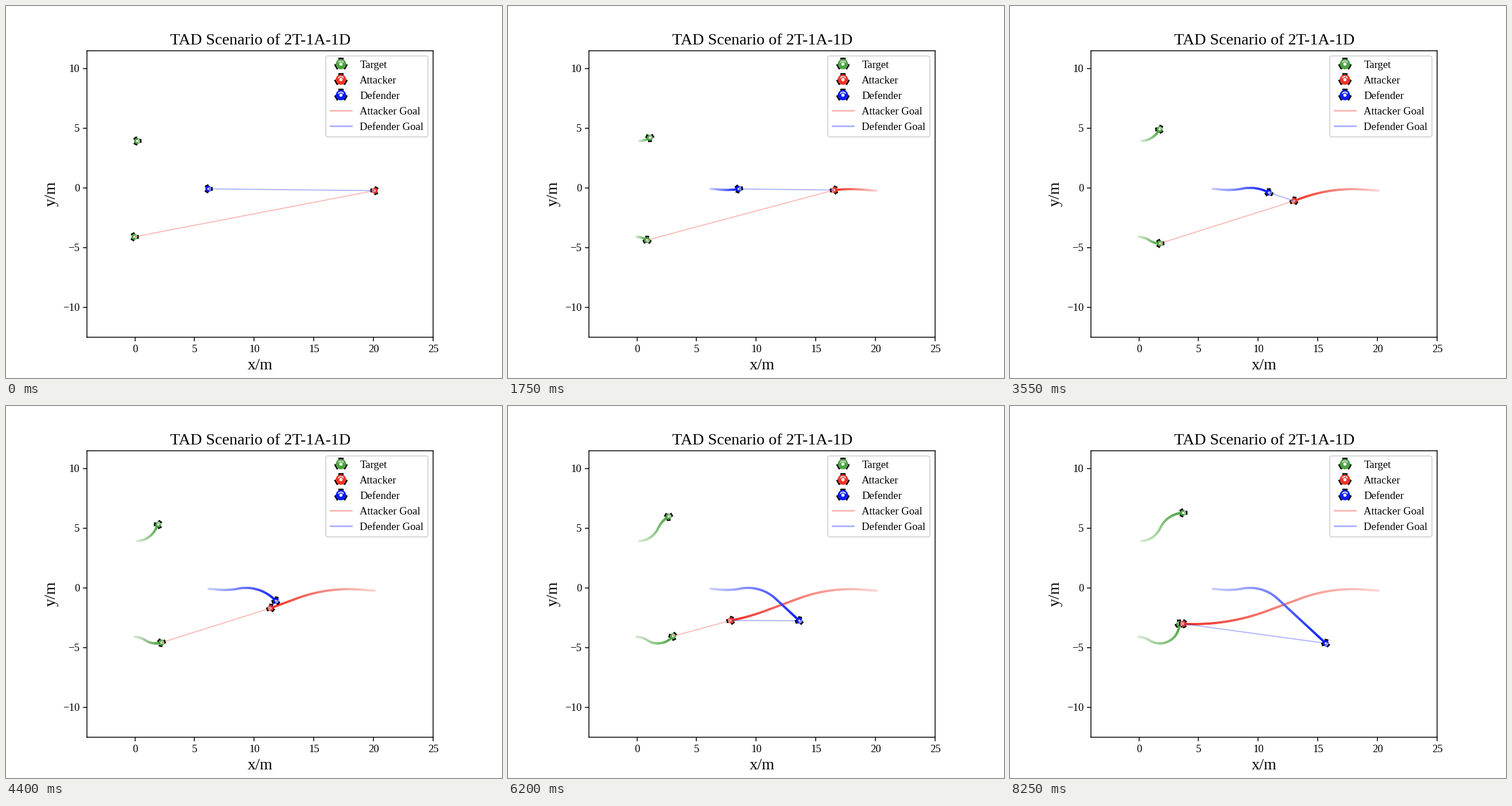
These frames come from a looping animation (864 by 648 pixels, 8300 ms). A matplotlib script:

```python
import numpy as np
import matplotlib.pyplot as plt
from matplotlib.animation import FuncAnimation
from matplotlib.collections import LineCollection
from matplotlib.colors import to_rgb
from matplotlib.legend_handler import HandlerBase
from matplotlib.lines import Line2D
from matplotlib.patches import Circle, Polygon, Wedge
from matplotlib.transforms import Affine2D

plt.rcParams["font.family"] = "Liberation Serif"

FRAMES = 166
GREEN, RED, BLUE = "#4aa340", "#ee3326", "#0a1cfa"


def drive(start, speed, turns):
    """Constant-speed path; the heading turns evenly between (step, degrees) keys."""
    heading = np.radians(np.interp(np.arange(FRAMES), *zip(*turns)))
    mid = (heading[1:] + heading[:-1]) / 2
    moves = speed * np.column_stack([np.cos(mid), np.sin(mid)])
    return np.vstack([start, start + np.cumsum(moves, axis=0)]), heading


def robot_parts(color, body):
    """Three-wheeled robot of unit size, facing +x."""
    wheel = np.array([(.55, -.52), (1.17, -.52), (1.17, .52), (.55, .52)])
    parts = [Polygon(Affine2D().rotate_deg(a).transform(wheel), fc="black", lw=0)
             for a in (0, 120, 240)]
    parts.append(Circle((0, 0), body, fc=color, lw=0))
    parts.append(Wedge((0, 0), .68, -62, 62, width=.24, fc="lightgray", lw=0))
    parts.append(Circle((0, 0), .3, fc="white", lw=0))
    return parts


class RobotHandler(HandlerBase):
    def create_artists(self, legend, orig, xd, yd, w, h, size, trans):
        parts = robot_parts(orig.get_facecolor(), .96)
        place = Affine2D().rotate_deg(90).scale(5).translate(w / 2 - xd, h / 2 - yd)
        for part in parts:
            part.set_transform(place + trans)
        return parts


class Robot:
    SIZE = .31

    def __init__(self, ax, color, z, start, speed, turns):
        self.ax = ax
        self.path, self.heading = drive(np.array(start), speed, turns)
        self.rgb = np.array(to_rgb(color))
        self.trail = LineCollection([], linewidths=2, capstyle="round", zorder=1 + z / 10)
        ax.add_collection(self.trail, autolim=False)
        self.parts = robot_parts(color, .82)
        for part in self.parts:
            part.set_zorder(2 + z / 10)
            ax.add_artist(part)

    def update(self, i):
        pts = self.path[:i + 1]
        self.trail.set_segments(np.stack([pts[:-1], pts[1:]], axis=1))
        fade = np.linspace(.2, 1, max(i, 1))[:, None]
        self.trail.set_color(1 - fade * (1 - self.rgb))
        place = (Affine2D().rotate(self.heading[i]).scale(self.SIZE)
                 .translate(*self.path[i]))
        for part in self.parts:
            part.set_transform(place + self.ax.transData)
        return [self.trail, *self.parts]


fig, ax = plt.subplots(figsize=(6.4, 4.8), dpi=135)
ax.set_aspect("equal")
ax.set_xlim(-4, 25)
ax.set_ylim(-12.5, 11.5)
ax.set_xticks(range(0, 26, 5))
ax.set_yticks(range(-10, 11, 5))
ax.set_title("TAD Scenario of 2T-1A-1D", fontsize=15)
ax.set_xlabel("x/m", fontsize=15)
ax.set_ylabel("y/m", fontsize=15)

upper = Robot(ax, GREEN, 0, (.19, 3.93), .027,
              [(0, 2), (70, 62), (80, 62), (165, 2)])
lower = Robot(ax, GREEN, 1, (-.04, -4.10), .027,
              [(0, -2), (36, -33), (165, 90)])
attacker = Robot(ax, RED, 2, (20.09, -.23), .1018,
                 [(0, 176), (13, 176), (65, 200.3), (95, 200.3), (165, 177)])
defender = Robot(ax, BLUE, 3, (6.16, -.08), .0679,
                 [(0, -2), (9, -7), (37, 11), (84, -42.8)])
robots = [upper, lower, attacker, defender]

goals = [(ax.plot([], [], color=c, alpha=.33, lw=1, zorder=4)[0], a, b)
         for c, a, b in ((RED, attacker, lower), (BLUE, defender, attacker))]

handles = [Circle((0, 0), 1, fc=c) for c in (GREEN, RED, BLUE)]
handles += [Line2D([], [], color=c, alpha=.35, lw=1.5) for c in (RED, BLUE)]
ax.legend(handles, ["Target", "Attacker", "Defender", "Attacker Goal", "Defender Goal"],
          loc="upper right", fontsize=10, labelspacing=.53, handletextpad=.75,
          handler_map={Circle: RobotHandler()})


def update(i):
    artists = [a for r in robots for a in r.update(i)]
    for line, a, b in goals:
        line.set_data(*np.array([a.path[i], b.path[i]]).T)
        artists.append(line)
    return artists


anim = FuncAnimation(fig, update, frames=FRAMES, interval=50, repeat=True, repeat_delay=0)
plt.show()
```
